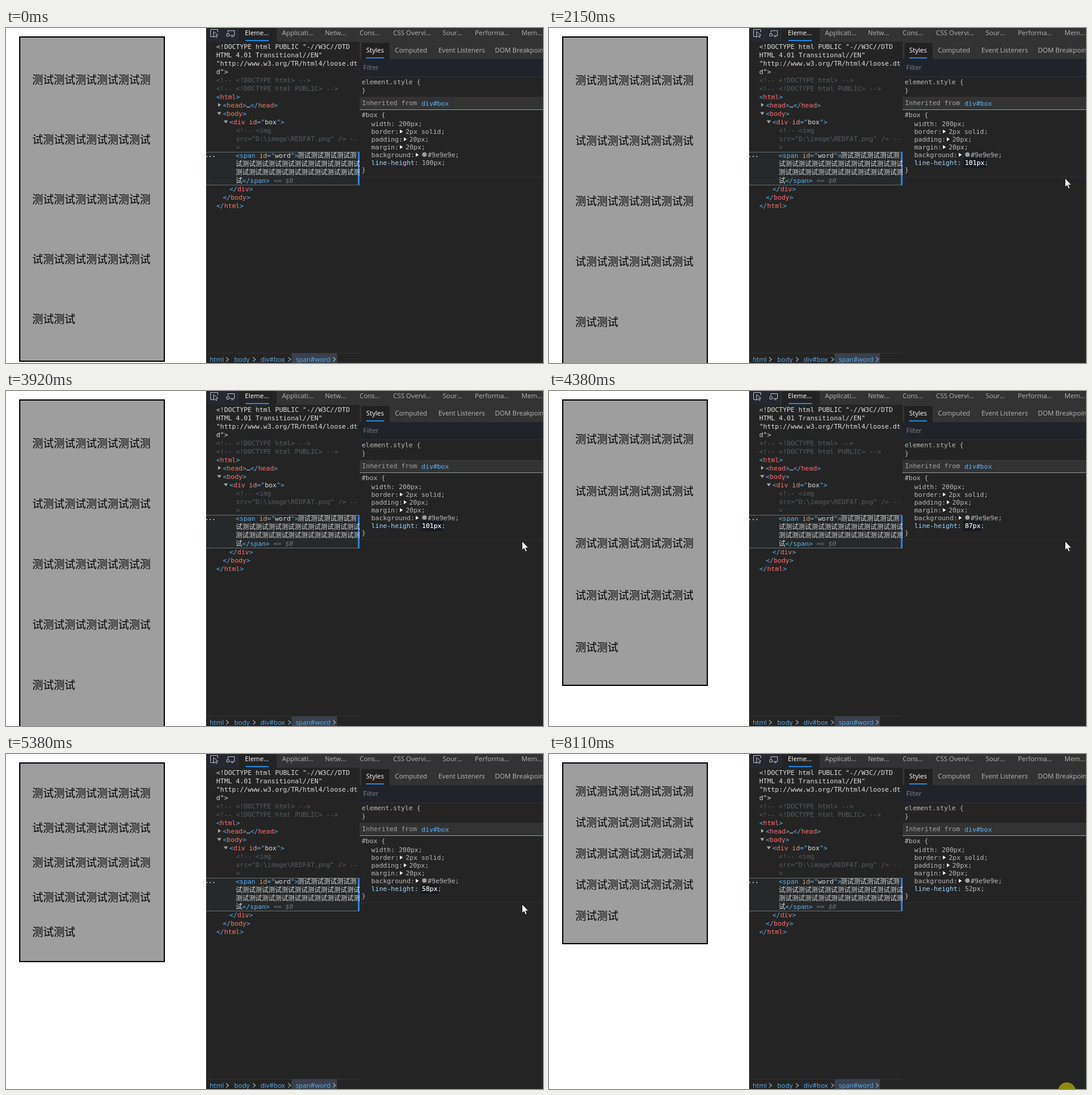
An HTML page for the animation above (8190 ms loop, 899 by 560 pixels).

```html
<!DOCTYPE html>
<html lang="zh-CN">
<head>
<meta charset="utf-8">
<title>line-height</title>
<style>
  html, body { margin: 0; width: 100%; height: 100%; overflow: hidden; background: #fff; }
  svg { display: block; }
  text { white-space: pre; }
  .mono { font: 11px "DejaVu Sans Mono", "Noto Sans CJK SC", monospace; letter-spacing: -0.05px; }
  .ui { font: 11px "Open Sans", "Noto Sans", sans-serif; }
  .page { font: 350 18px "Noto Sans CJK SC", "Noto Sans CJK", sans-serif; }
</style>
</head>
<body>
<svg id="stage" width="899" height="560" viewBox="0 0 899 560"></svg>
<script>
const LOOP = 8190, STEP = 76.6;
const stage = document.getElementById('stage');

function add(tag, attrs, parent = stage) {
  const el = document.createElementNS('http://www.w3.org/2000/svg', tag);
  for (const k in attrs) el.setAttribute(k, attrs[k]);
  parent.appendChild(el);
  return el;
}
const rect = (x, y, width, height, fill) => add('rect', { x, y, width, height, fill });
const path = (d, attrs, parent) => add('path', { d, ...attrs }, parent);
const line = (d, stroke, width = 1) => path(d, { fill: 'none', stroke, 'stroke-width': width });

// parts alternate: text, colour, text, colour ...
function text(cls, x, y, ...parts) {
  const el = add('text', { class: cls, x, y });
  for (let i = 0; i < parts.length; i += 2)
    add('tspan', { fill: parts[i + 1] }, el).textContent = parts[i];
  return el;
}
const mono = (...a) => text('mono', ...a);
const ui = (...a) => text('ui', ...a);
const words = (n, from = 0) =>
  Array.from({ length: n }, (_, i) => '测试'[(i + from) % 2]).join('');

const BLUE = '#5db0f0', RED = '#ff6f6b', PALE = '#dcdcdc', DIM = '#575c60',
      ATTR = '#d99a80', GREY = '#b9b9b9', ACCENT = '#1f86e5';

// Page with the text box
rect(0, 0, 335, 560, '#fff');
const box = add('rect', { x: 23, y: 15, width: 242, fill: '#9e9e9e', stroke: '#000', 'stroke-width': 2 });
const lines = [0, 1, 2, 3, 4].map(i => text('page', 44, 0, words(i < 4 ? 11 : 4, i), '#000'));

// Tool bars
rect(335, 0, 564, 560, '#242424');
rect(335, 0, 564, 23, '#333');
rect(335, 0, 53, 23, '#252830');
rect(389, 0, 64, 23, '#232323');
rect(401, 20, 39, 2, ACCENT);
line('M347 14.5H342.5V2.5H354.5V7', '#b8bcc0');
path('M347.5 6V15.5L350 13.2L352 16L353.6 15L351.8 12.2L355 12Z', { fill: 'none', stroke: '#b8bcc0' });
line('M373 13.5H369.5V9.5H373.5V13.5M371.5 8V4.5H382.5V12.5H375M377 14.5H381', '#b8bcc0');
[['Eleme…', 400], ['Applicati…', 462], ['Netw…', 534], ['Cons…', 592], ['CSS Overvi…', 648],
 ['Sour…', 731], ['Performa…', 785], ['Mem…', 863]]
  .forEach(([s, x], i) => ui(x, 12, s, i ? '#b4b4b4' : '#fff'));

// Element tree
rect(335, 207, 257, 56, '#262929');
line('M335 207.5H592M335 262.5H592', '#626a6a');
rect(589, 207, 3, 56, '#2b80e0');
for (let i = 0; i < 3; i++) rect(335 + i * 6, 214, 2, 1.6, '#c4c4c4');

const tag = (name, close = '') => ['<' + close, BLUE, name, RED, '>', BLUE];
const open = (name, id, color) =>
  ['<', BLUE, name, color, ' id', ATTR, '="', BLUE, id, PALE, '">', BLUE];
const tree = [
  [352, '<!DOCTYPE html PUBLIC "-//W3C//DTD', PALE],
  [352, 'HTML 4.01 Transitional//EN"', PALE],
  [352, '"http://www.w3.org/TR/html4/loose.dt', PALE],
  [352, 'd">', PALE],
  [352, '<!-- <!DOCTYPE html> -->', DIM],
  [352, '<!-- <!DOCTYPE html PUBLIC> -->', DIM],
  [352, ...tag('html')],
  [363, ...tag('head'), '…', PALE, ...tag('head', '/')],
  [363, ...tag('body')],
  [374, ...open('div', 'box', RED)],
  [385, '<!-- <img', DIM],
  [385, 'src="D:\\image\\REDFAT.png" /> --', DIM],
  [385, '>', DIM],
  [384.5, ...open('span', 'word', BLUE)],
  [384.5, words(19, 1), PALE],
  [384.5, words(19), PALE],
  [384.5, words(1, 1), PALE, '</span>', BLUE, ' == $0', '#70767a'],
  [374, ...tag('div', '/')],
  [363, ...tag('body', '/')],
  [352, ...tag('html', '/')]
];
const rows = tree.map(([x, ...parts], i) => mono(x, 35 + i * 14, ...parts));
rows[16].lastChild.setAttribute('font-style', 'italic');
mono(488, 217, words(9), PALE);
const right = (x, y, fill) => path(`M${x} ${y - 3.2}L${x + 5} ${y}L${x} ${y + 3.2}Z`, { fill });
const down = (x, y) => path(`M${x} ${y - 2.5}H${x + 7}L${x + 3.5} ${y + 2.5}Z`, { fill: '#a6a6a6' });
right(355, 128.5, '#a6a6a6');
down(353.5, 143);
down(364.5, 157);

// Breadcrumbs
rect(335, 543, 257, 17, '#242424');
line('M335 543.5H592', '#343434');
rect(478, 544, 76, 16, '#3a404c');
[['html', 341, 368.5], ['body', 382, 413.5], ['div#box', 426, 472.5], ['span#word', 485, 547.5]]
  .forEach(([s, x, arrow]) => {
    ui(x, 558, s, BLUE);
    line(`M${arrow} 550.5L${arrow + 4} 554L${arrow} 557.5`, '#9ba5b0', 1.2);
  });

// Styles pane
rect(592, 23, 307, 29, '#333');
rect(595, 25, 47, 27, '#212121');
rect(603, 49, 30, 2, ACCENT);
[['Styles', 603], ['Computed', 651], ['Event Listeners', 724], ['DOM Breakpoints', 818.5]]
  .forEach(([s, x], i) => ui(x, 41, s, i ? '#b8b8b8' : '#fff'));
rect(592, 52, 307, 30, '#202329');
line('M592 81.5H899', '#2d3035');
ui(598, 70, 'Filter', '#7d828a');
mono(595.5, 94, 'element.style {', GREY);
mono(595.5, 108, '}', GREY);
rect(592, 115, 307, 21, '#333');
line('M592 136.5H899', '#8f979c');
mono(596, 129, 'Inherited from', '#a2a2a2');
mono(695.5, 130, 'div#box', BLUE);
mono(595.5, 149, '#box {', GREY);
mono(611.5, 164, 'width: 200px;', GREY);
[['border:', 659.5, '2px solid;', 669], ['padding:', 666, '20px;', 675], ['margin:', 659.5, '20px;', 669],
 ['background:', 686, '#9e9e9e;', 706]]
  .forEach(([name, arrow, value, x], i) => {
    const y = 177 + i * 13;
    mono(611.5, y, name, GREY);
    right(arrow, y - 4, '#fff');
    mono(x, y, value, GREY);
  });
add('circle', { cx: 700.5, cy: 211.5, r: 3.8, fill: '#9e9e9e' });
mono(611.5, 229, 'line-height:', '#a3d7fa');
const field = rect(694, 217, 38, 17, '#171a20');
const value = mono(696.2, 229, '', '#fff', ';', GREY);
mono(595.5, 241, '}', GREY);
line('M592 248.5H899', '#2a2c32');

const checks = add('g', {});
for (let i = 0; i < 6; i++) {
  const y = 154.5 + i * 13;
  add('rect', { x: 596.5, y, width: 11, height: 11, rx: 2, fill: '#99c8ff' }, checks);
  path(`M599 ${y + 5.5}l2.3 2.5l4 -5`, { fill: 'none', stroke: '#222', 'stroke-width': 1.5 }, checks);
}

// Pointer
const halo = add('circle', { r: 15, fill: '#f5f000', opacity: 0.5 });
const pointer = path('M0 0V15L3.4 12L5.8 17.6L8.2 16.6L5.9 11.2H10.6Z',
  { fill: '#fff', stroke: '#000', 'stroke-width': 0.8 });

// Key presses and key repeats: start time, then one value per step
const runs = [
  [0, 100], [2150, 101], [2610, 102, 104, 106, 108], [3300, 107],
  [3760, 106, 103, 101, 99, 97, 94, 92, 89, 87, 85, 83],
  [4610, 80, 78, 75, 73, 71, 69, 66, 64, 62, 60, 58],
  [5850, 57], [6080, 56], [6230, 55], [6470, 54], [6640, 53], [6790, 52]
];
const moves = [
  [70, 812, 499], [450, 760, 325], [820, 712, 222], [990, 712, 222], [1370, 864, 251],
  [7339, 864, 251], [7340, 819, 276], [7569, 819, 276], [7570, 834, 485],
  [7725, 866, 520], [7880, 888, 546], [7960, 867, 564], [LOOP, 867, 564]
];

function heightAt(t) {
  const [start, ...steps] = runs.filter(r => r[0] <= t).pop();
  return steps[Math.min(steps.length - 1, Math.floor((t - start) / STEP))];
}

function pointerAt(t) {
  const i = moves.findIndex(m => m[0] > t);
  if (i < 1) return [812, 499];
  const [t0, x0, y0] = moves[i - 1], [t1, x1, y1] = moves[i];
  const k = Math.floor((t - t0) / 75) * 75 / (t1 - t0);
  return [x0 + (x1 - x0) * k, y0 + (y1 - y0) * k];
}

const show = (el, on) => el.setAttribute('visibility', on ? 'visible' : 'hidden');

function draw(t) {
  const h = heightAt(t), editing = t >= 990 && t < 8110;
  box.setAttribute('height', 5 * h + 42);
  lines.forEach((el, i) => el.setAttribute('y', 43 + Math.round(h * (i + 0.5))));

  const label = value.firstChild;
  label.textContent = h + 'px';
  label.setAttribute('fill', editing ? '#fff' : GREY);
  label.setAttribute('stroke', editing ? '#fff' : 'none');
  label.setAttribute('stroke-width', 0.15);
  field.setAttribute('width', h > 99 ? 38 : 31);
  show(field, editing);

  const [x, y] = pointerAt(t);
  const visible = t >= 70 && t < 7420 || t >= 7570;
  pointer.setAttribute('transform', `translate(${x} ${y})`);
  halo.setAttribute('cx', x);
  halo.setAttribute('cy', y);
  show(pointer, visible);
  show(halo, t >= 910 && t < 990 || t >= 8110);
  show(checks, visible && y > 137 && y < 248);
}

const begin = performance.now();
function tick() {
  draw((performance.now() - begin) % LOOP);
  requestAnimationFrame(tick);
}
tick();
</script>
</body>
</html>
```
